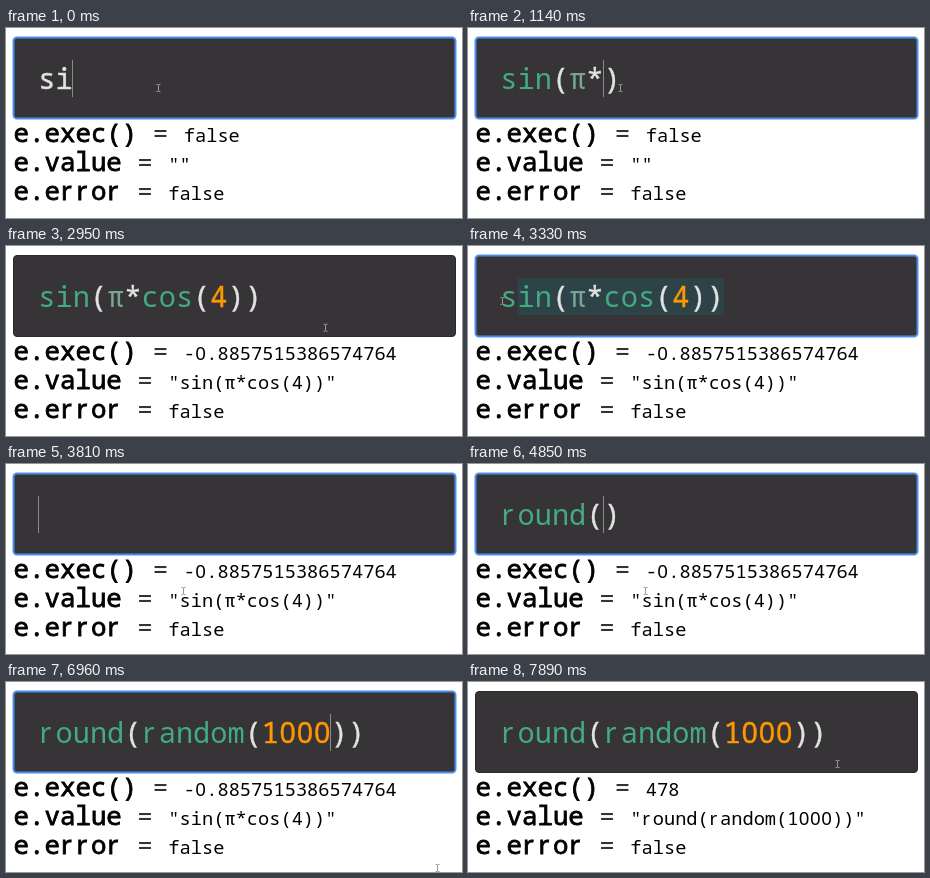
An HTML page that plays this animation: 456x190 px, repeating every 8 s.

```html
<!DOCTYPE html>
<html>
<head>
<meta charset="utf-8">
<style>
html, body { margin: 0; width: 456px; height: 190px; overflow: hidden; background: #fff; }
svg { display: block; }
text { font-family: "Noto Sans Mono", "DejaVu Sans Mono", monospace; white-space: pre; }
#code { font-size: 28.67px; fill: #e2e2e2; stroke: #e2e2e2; stroke-width: .4; }
.label { font-size: 25.8px; stroke: #000; stroke-width: .8; }
.eq { fill: #333; stroke: none; }
.value { font-size: 18.7px; }
#code .fn { fill: #43aa83; stroke: none; }
#code .pi { fill: #78a594; stroke: none; }
#code .num { fill: #ff9800; stroke: #ff9800; }
/* r without a foot and 0 without a slash, spaced to fill a 0.6em cell */
.r, .zero { font-family: "Noto Sans", sans-serif; }
.r { letter-spacing: .147em; }
.zero { letter-spacing: .014em; }
</style>
</head>
<body>
<svg width="456" height="190">
  <rect id="box" x="7.5" y="9.5" width="442" height="81" rx="3.5" fill="#363436"/>
  <rect id="sel" y="32" height="37" fill="#2d4347"/>
  <text id="code" x="32.3" y="61"></text>
  <rect id="caret" y="32" width="1" height="37" fill="#8a8a8a"/>
  <g id="results"></g>
  <path id="pointer" d="M-2-3.5h1.5l.5.5.5-.5h1.5M0-3v6M-2 3.5h1.5l.5-.5.5.5h1.5" fill="none" stroke="#999"/>
</svg>
<script>
const $ = id => document.getElementById(id);
const LOOP = 8000, LEFT = 32.3, CELL = 17.2, BLINK = 310;
const FIRST = 'sin(π*cos(4))', SECOND = 'round(random(1000))';

// [time, text, caret column]
const typing = [
  [0, 'si', 2], [30, 'sin', 3], [260, 'sin()', 4], [790, 'sin(π)', 5],
  [1140, 'sin(π*)', 6], [1370, 'sin(π*c)', 7], [1490, 'sin(π*co)', 8],
  [1610, 'sin(π*cos)', 9], [1880, 'sin(π*cos())', 10], [2200, FIRST, 11],
  [3810, '', 0], [4300, 'r', 1], [4360, 'ro', 2], [4430, 'rou', 3],
  [4500, 'roun', 4], [4560, 'round', 5], [4850, 'round()', 6],
  [5390, 'round(r)', 7], [5420, 'round(ra)', 8], [5460, 'round(ran)', 9],
  [5650, 'round(rand)', 10], [5730, 'round(rando)', 11],
  [5800, 'round(random)', 12], [6070, 'round(random())', 13],
  [6390, 'round(random(1))', 14], [6570, 'round(random(10))', 15],
  [6700, 'round(random(100))', 16], [6830, SECOND, 17]
];

// [time, exec, value]
const outputs = [
  [0, 'false', ''], [2480, '-0.8857515386574764', FIRST], [7200, '478', SECOND]
];

// [time, x, y]
const path = [
  [0, 152, 60], [2250, 152, 60], [2420, 309, 143], [2570, 309, 143],
  [2700, 309, 127], [2950, 319, 82], [3060, 318, 55], [3160, 318, 55],
  [3220, 270, 55], [3330, 34, 55], [3500, 30, 55], [3800, 177, 127],
  [6420, 177, 127], [6700, 360, 170], [6900, 431, 186], [7000, 431, 186],
  [7150, 431, 148], [7770, 431, 148], [7890, 369, 82], [LOOP, 369, 82]
];

const stepAt = (list, t) => list.findLast(s => s[0] <= t);

function pointAt(t) {
  const i = path.findIndex(p => p[0] > t);
  const [t0, x0, y0] = path[i - 1], [t1, x1, y1] = path[i];
  const k = (t - t0) / (t1 - t0);
  return [x0 + (x1 - x0) * k, y0 + (y1 - y0) * k];
}

const span = (cls, s, dx = 0) => `<tspan class="${cls}" dx="${dx}em">${s}</tspan>`;

const glyphs = s => s.replace(/[r0]/g, c =>
  c === 'r' ? span('r', c, .04) : span('zero', c, .014));

function paint(s) {
  return s.replace(/[a-z]+|\d+|π/g, (token, at) => {
    const cls = token === 'π' ? 'pi' : /\d/.test(token) ? 'num'
      : s[at + token.length] === '(' ? 'fn' : 'plain';
    return span(cls, glyphs(token));
  });
}

const line = (name, value, i) => {
  const y = 114 + 29 * i;
  return `<text class="label" x="7.5" y="${y}">${glyphs(name)} <tspan class="eq" dy="1">=</tspan></text>
    <text class="value" x="${7.5 + 15.48 * (name.length + 3)}" y="${y}">${glyphs(value)}</text>`;
};

const shown = {};
function setMarkup(id, html) {
  if (shown[id] !== html) $(id).innerHTML = shown[id] = html;
}

function setBar(id, x, width, visible) {
  $(id).setAttribute('x', x);
  $(id).setAttribute('width', width);
  $(id).setAttribute('visibility', visible ? 'visible' : 'hidden');
}

function draw(t) {
  const [typed, text, col] = stepAt(typing, t);
  const [, exec, value] = stepAt(outputs, t);
  const [px, py] = pointAt(t);
  const focused = !(t >= 2480 && t < 3220 || t >= 7200);
  const selecting = t >= 3220 && t < 3810;

  $('box').setAttribute('stroke', focused ? '#4a8fee' : '#2b2a2c');
  $('box').setAttribute('stroke-width', focused ? 2 : 1);
  setMarkup('code', paint(text));
  setMarkup('results', line('e.exec()', exec, 0) +
    line('e.value', `"${value}"`, 1) + line('e.error', 'false', 2));

  const dragX = t < 3400 ? px : LEFT;
  const from = Math.max(0, Math.min(13, Math.round((dragX + 8 - LEFT) / CELL)));
  setBar('sel', LEFT + from * CELL, (13 - from) * CELL, selecting);

  const lit = Math.floor((t - typed) / BLINK) % 2 === 0;
  setBar('caret', Math.round(LEFT + col * CELL - .3), 1, focused && !selecting && lit);
  $('pointer').setAttribute('transform', `translate(${px + .5} ${py})`);
}

const start = performance.now();
function tick() {
  draw((performance.now() - start) % LOOP);
  requestAnimationFrame(tick);
}
tick();
</script>
</body>
</html>
```
